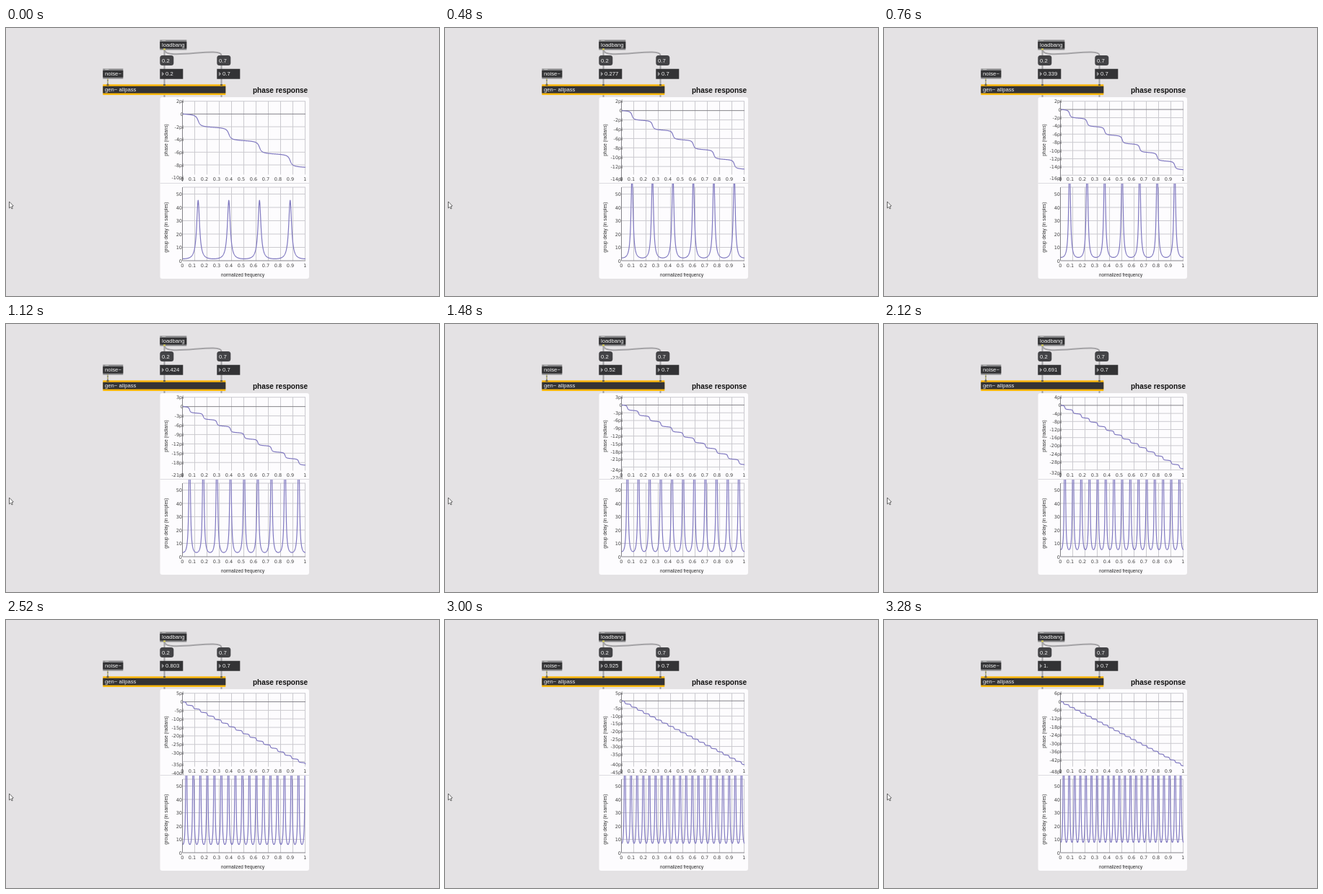
Recreate the animation shown at these times as an HTML page with a canvas. Size 600x372 px, loop 3920 ms.

```html
<!DOCTYPE html>
<html lang="en">
<head>
<meta charset="utf-8">
<title>Allpass phase response</title>
<style>
html, body { margin: 0; width: 100%; height: 100%; overflow: hidden; background: #e4e2e4; }
canvas { display: block; }
</style>
</head>
<body>
<canvas id="stage" width="600" height="372"></canvas>
<script>
const ctx = document.getElementById('stage').getContext('2d');
const SANS = '"Liberation Sans", Arial, sans-serif';
const TICK = '6.5px "DejaVu Sans", Verdana, sans-serif';
const LOOP = 3920, GAIN = 0.7;
const LEFT = 245, WIDTH = 170, TOP = 101.7;
const CURVE = '#8079c0', GRID = '#cbcacf', AXIS = '#85848a', DARK = '#333335', CORD = '#a3a2a5';

// Delay time in ms over the loop: [time, value]
const DELAY = [[40, .2], [200, .215], [760, .339], [800, .339], [1480, .52],
  [2120, .691], [2520, .803], [3000, .925], [3280, 1]];
// Phase axis depth for a delay in samples
const DEPTH = [[8, 9.66], [14, 16.07], [22, 25.7], [30, 32.8], [35, 38.5], [40, 43.8], [44, 47.3]];

function interpolate(keys, x) {
  if (x <= keys[0][0]) return keys[0][1];
  for (let i = 1; i < keys.length; i++) {
    const [x0, y0] = keys[i - 1], [x1, y1] = keys[i];
    if (x <= x1) return y0 + (y1 - y0) * (x - x0) / (x1 - x0);
  }
  return keys[keys.length - 1][1];
}

function rect(x, y, w, h, color, radius = 0) {
  ctx.fillStyle = color;
  ctx.beginPath();
  ctx.roundRect(x, y, w, h, radius);
  ctx.fill();
}

function text(str, x, y, font, color = '#444', align = 'left') {
  ctx.font = font;
  ctx.fillStyle = color;
  ctx.textAlign = align;
  ctx.textBaseline = 'alphabetic';
  ctx.fillText(str, x, y);
}

function line(x0, y0, x1, y1, color, width = 1) {
  ctx.strokeStyle = color;
  ctx.lineWidth = width;
  ctx.beginPath();
  ctx.moveTo(x0, y0);
  ctx.lineTo(x1, y1);
  ctx.stroke();
}

function sideways(str, y) {
  ctx.save();
  ctx.translate(224, y);
  ctx.rotate(-Math.PI / 2);
  text(str, 0, 0, '6.4px ' + SANS, '#333', 'center');
  ctx.restore();
}

function label(str, x, y) {
  text(str, x, y, '7.7px ' + SANS, '#f2f2f2');
}

function objectBox(name, x, y, w) {
  rect(x, y, w, 14, '#858587');
  rect(x, y + 2.5, w, 9.5, DARK);
  rect(x + 3, y, 5, 1.5, '#b5b5b5');
  label(name, x + 2.7, y + 9.6);
}

function messageBox(str, x) {
  rect(x, 38, 19, 14, '#434346', 3.5);
  label(str, x + 2.7, 47.7);
}

function numberBox(str, x) {
  rect(x, 56.7, 32, 14, DARK);
  ctx.fillStyle = '#929294';
  ctx.beginPath();
  ctx.moveTo(x + 2.5, 60.5);
  ctx.lineTo(x + 6, 63.7);
  ctx.lineTo(x + 2.5, 67);
  ctx.fill();
  label(str, x + 7.7, 66.1);
}

function signalCord(x, y0, y1) {
  line(x, y0, x, y1, '#6b6a60', 1.3);
  ctx.setLineDash([2, 2]);
  line(x, y0, x, y1, '#dcd67c', 1.3);
  ctx.setLineDash([]);
}

function drawPatch(value) {
  for (const x of [219.5, 298.5]) {
    line(x, 50, x, 79, CORD, 2);
    line(x, 93, x, 97, CORD, 2);
  }
  line(219.5, 29, 219.5, 39, CORD, 2);
  ctx.beginPath();
  ctx.moveTo(219.5, 30);
  ctx.bezierCurveTo(219.5, 46, 298.5, 25, 298.5, 38);
  ctx.stroke();
  signalCord(141, 70, 79);

  objectBox('loadbang', 213.3, 16.5, 37);
  rect(218, 28.5, 3, 2, '#d8cf55');
  objectBox('noise~', 134.3, 56.5, 28);
  messageBox('0.2', 213.3);
  messageBox('0.7', 292.3);
  numberBox(value, 213.3);
  numberBox('0.7', 292.3);
  rect(134.3, 78.3, 170, 14.6, '#fdb90d');
  rect(134.3, 80.7, 170, 9.7, DARK);
  for (const x of [141, 219.5, 298.5]) rect(x - 1.5, 78.3, 3, 1.5, '#444');
  label('gen~ allpass', 137, 88.1);
  text('phase response', 342, 90, 'bold 10px ' + SANS, '#111');
}

function verticals(y0, y1) {
  for (let i = 1; i <= 10; i++) line(LEFT + 17 * i - .5, y0, LEFT + 17 * i - .5, y1, GRID);
}

function frequencyLabels(y) {
  for (let i = 0; i <= 10; i++) {
    const x = LEFT + 17 * i - (i % 10 ? 4 : .7);
    text(String(i / 10), x, y, TICK, '#444', 'center');
  }
}

function plot(toY) {
  ctx.strokeStyle = CURVE;
  ctx.lineWidth = 1.2;
  ctx.lineJoin = 'round';
  ctx.beginPath();
  for (let x = 0; x <= WIDTH; x += .25) ctx.lineTo(LEFT + x, toY(Math.PI * x / WIDTH));
  ctx.stroke();
}

function clipped(y, h, draw) {
  ctx.save();
  ctx.beginPath();
  ctx.rect(213.5, y, 206.5, h);
  ctx.clip();
  draw();
  ctx.restore();
}

function drawPhase(samples) {
  const step = samples < 18 ? 2 : samples < 26 ? 3 : samples < 33 ? 4 : samples < 42 ? 5 : 6;
  const unit = 103 / (step + interpolate(DEPTH, samples));
  const gap = step * unit, zero = TOP + gap;

  verticals(TOP, 203.5);
  for (let i = 1; zero - i * gap < 216; i--) {
    const y = zero - i * gap;
    if (y < 205) line(LEFT, y, LEFT + WIDTH, y, i ? GRID : AXIS);
    // Crowded lower labels sit a little below their lines
    const drop = gap < 15 && y > 196 ? 4 : 0;
    text(i ? i * step + 'pi' : '0', 246, y + drop + 2.5, TICK, '#444', 'right');
  }
  line(LEFT - .5, TOP - 1, LEFT - .5, 213, AXIS);
  frequencyLabels(212.2);
  sideways('phase (radians)', 155.5);
  plot(w => {
    const a = w * samples;
    const phase = -a + 2 * Math.atan2(GAIN * Math.sin(a), 1 + GAIN * Math.cos(a));
    return zero - phase / 3 * unit;
  });
}

function drawGroupDelay(samples) {
  verticals(221, 323);
  line(LEFT, 221, LEFT + WIDTH, 221, GRID);
  for (let i = 0; i <= 5; i++) {
    const y = 323 - 18.5 * i;
    line(LEFT, y, LEFT + WIDTH, y, i ? GRID : AXIS);
    text(String(i * 10), 244, y + 2.5, TICK, '#444', 'right');
  }
  line(LEFT - .5, 221, LEFT - .5, 323, AXIS);
  frequencyLabels(332.2);
  sideways('group delay (in samples)', 276.7);
  text('normalized frequency', 328, 345, '6.3px ' + SANS, '#222', 'center');
  plot(w => {
    const delay = samples * (1 - GAIN * GAIN) / (1 + GAIN * GAIN + 2 * GAIN * Math.cos(w * samples));
    return 323 - delay * 1.85;
  });
}

function drawPointer() {
  ctx.beginPath();
  for (const [x, y] of [[4.5, 241], [4.5, 250], [6.5, 248.2], [8, 251], [9.2, 250.4], [8, 247.6], [10.3, 247]])
    ctx.lineTo(x, y);
  ctx.closePath();
  ctx.fillStyle = '#fff';
  ctx.fill();
  ctx.strokeStyle = '#444';
  ctx.lineWidth = .8;
  ctx.stroke();
}

function frame(now) {
  const time = Math.floor(now % LOOP / 40) * 40;
  const value = interpolate(DELAY, time);
  const samples = Math.floor(value * 44.1);
  const shown = value === 1 ? '1.' : String(+value.toFixed(3));

  rect(0, 0, 600, 372, '#e4e2e4');
  drawPatch(shown);
  rect(213.5, 96, 206.5, 252, '#fdfcfe', 3);
  clipped(96, 119.5, () => drawPhase(samples));
  line(213.5, 215.5, 420, 215.5, '#dddce0');
  clipped(216, 132, () => drawGroupDelay(samples));
  drawPointer();
  requestAnimationFrame(frame);
}
requestAnimationFrame(frame);
</script>
</body>
</html>
```
